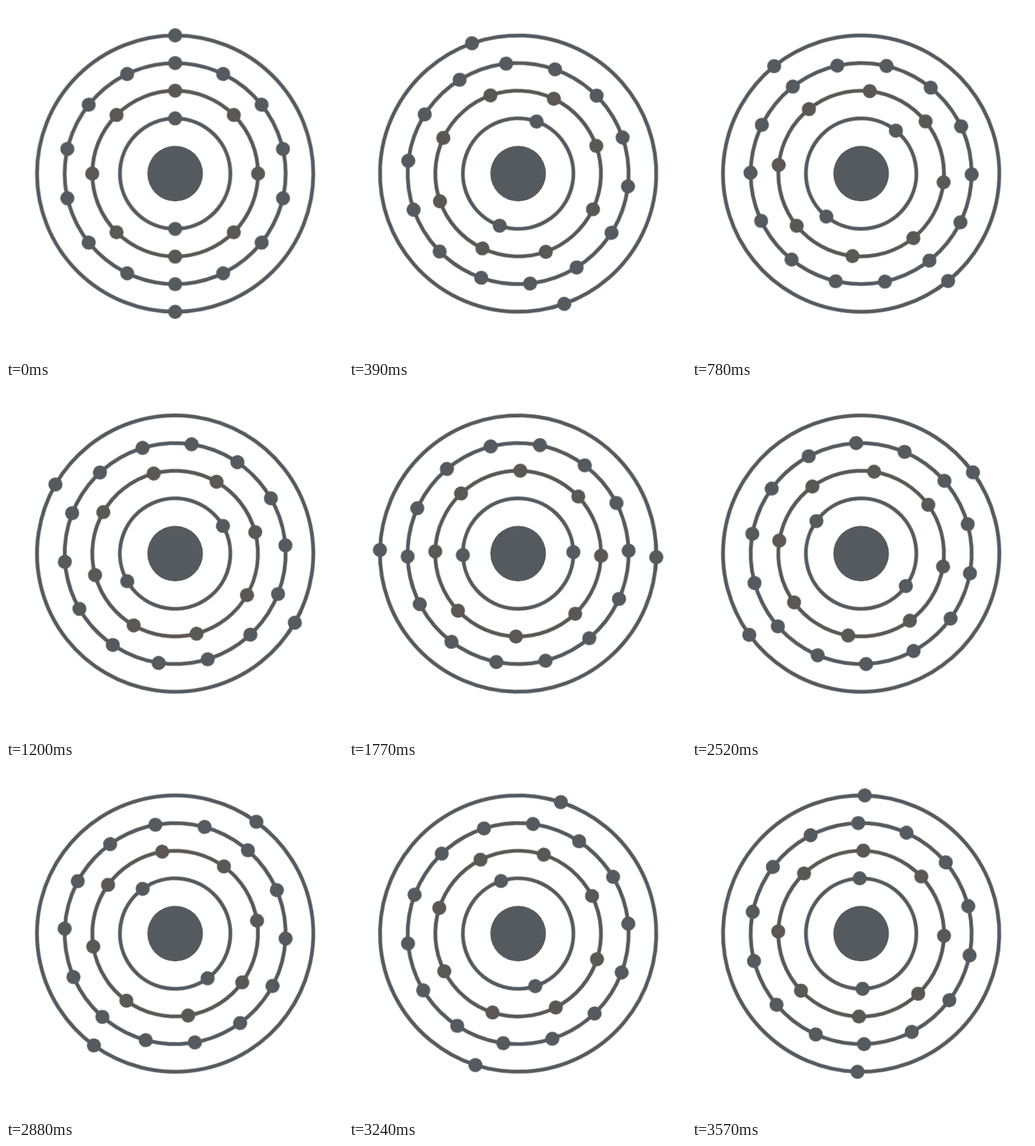
An HTML page that plays this animation: 473x494 px, repeating every 3.6 s.

```html
<!DOCTYPE html>
<html lang="en">
<head>
<meta charset="utf-8">
<title>Electron shells</title>
<style>
  html, body { margin: 0; width: 100%; height: 100%; overflow: hidden; background: #fff; }
  svg { display: block; width: 473px; height: 494px; }
  .shell { color: #545a5e; animation: turn 3.6s steps(120) infinite; }
  .shell.back { animation-name: turn-back; }
  .shell.warm { color: #5a5756; }
  .shell circle { fill: currentColor; }
  .shell .orbit { fill: none; stroke: currentColor; stroke-width: 5.3; }
  @keyframes turn { to { transform: rotate(180deg); } }
  @keyframes turn-back { to { transform: rotate(-180deg); } }
</style>
</head>
<body>
<svg viewBox="0 0 473 494">
  <g id="atom" transform="translate(237.4 235.2)">
    <circle r="39" fill="#545a5e"/>
  </g>
</svg>
<script>
  const spacing = 38.8;
  const counts = [2, 8, 14, 2];

  const add = (parent, tag, attrs) => {
    const el = document.createElementNS('http://www.w3.org/2000/svg', tag);
    for (const key in attrs) el.setAttribute(key, attrs[key]);
    return parent.appendChild(el);
  };

  // Neighbouring shells turn in opposite directions.
  const atom = document.getElementById('atom');
  counts.forEach((count, i) => {
    const r = spacing * (i + 2);
    const cls = 'shell' + (i % 2 ? ' back' : '') + (count === 8 ? ' warm' : '');
    const shell = add(atom, 'g', { class: cls });
    add(shell, 'circle', { class: 'orbit', r: r - 0.1 });
    for (let k = 0; k < count; k++) {
      add(shell, 'circle', { cy: -r, r: 9.9, transform: `rotate(${360 * k / count})` });
    }
  });
</script>
</body>
</html>
```
